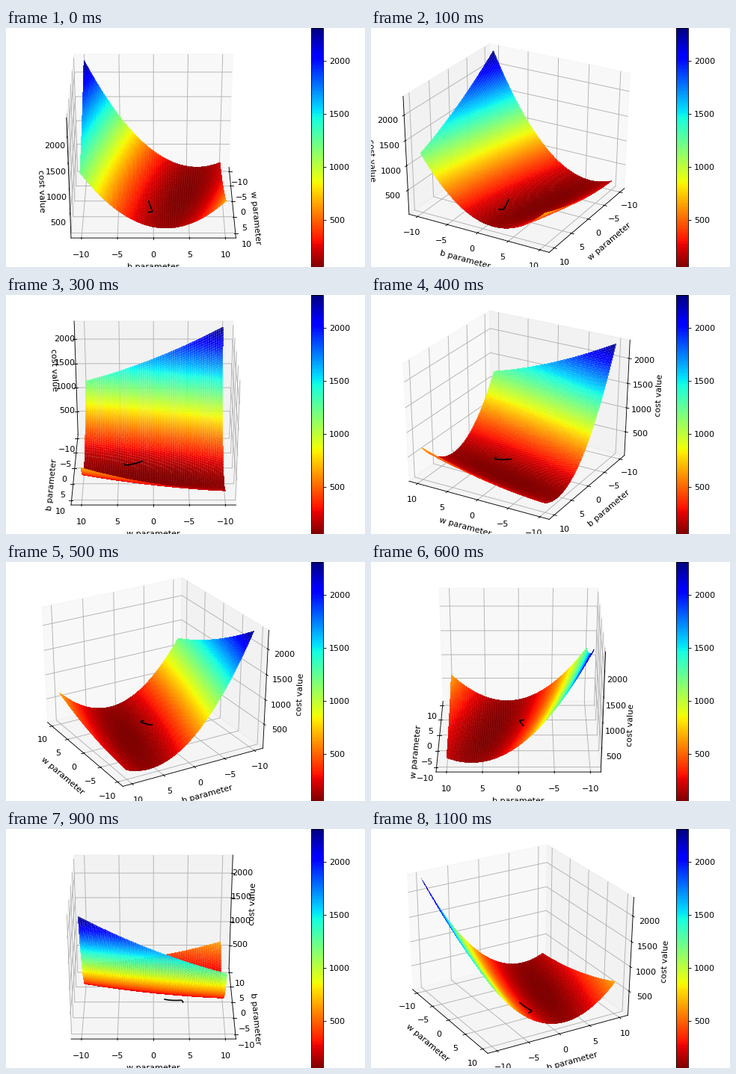
These frames come from a looping animation (480 px wide and 320 px high, 1.2 s). A matplotlib script:

```python
import numpy as np
import matplotlib.pyplot as plt
from matplotlib.animation import FuncAnimation
from matplotlib.cm import ScalarMappable
from matplotlib.colors import Normalize

FRAMES, INTERVAL = 12, 100
Z_LOW, Z_HIGH = 47, 2313
Z_TICKS = range(500, 2001, 500)
XY_TICKS = range(-10, 11, 5)


def cost(w, b):
    """Quadratic bowl with a slanted valley."""
    return 55 + 0.437 * (w + 0.52) ** 2 + 8.126 * (b - 4.12 + 0.2405 * w) ** 2


def padded(low, high):
    pad = (high - low) / 48
    return low - pad, high + pad


plt.rcParams["font.family"] = "DejaVu Sans"
fig = plt.figure(figsize=(6, 4), dpi=80, facecolor="white")

# Cube-shaped box stretched over the whole axes area.
ax = fig.add_axes([0, 0, 0.8, 1], projection="3d")
ax.apply_aspect = lambda position=None: None
ax.set_position([0, 0, 0.8, 1])
ax.set_box_aspect((1, 1, 1), zoom=np.sqrt(3) / 1.8294640721620434)

norm = Normalize(56, 2310)
side = np.linspace(-10, 10, 121)
w, b = np.meshgrid(side, side)
ax.plot_surface(w, b, cost(w, b), rcount=121, ccount=121, cmap="jet_r",
                vmin=norm.vmin, vmax=norm.vmax, alpha=0.7,
                linewidth=0, antialiased=False)

# Descent path
path_w = [1.62, 2.2, 2.8, 3.45, 4.05, 4.18, 4.28]
path_b = [-0.68, -0.56, -0.42, -0.28, -0.15, -0.35, -0.75]
path_z = [102, 80, 64, 54, 49, 48, 47]
ax.plot(path_w, path_b, path_z, color="black", lw=1.5, zorder=100)

ax.set_xlim(*padded(-11, 11))
ax.set_ylim(*padded(-11, 11))
ax.set_zlim(*padded(Z_LOW, Z_HIGH))
ax.set_xticks(XY_TICKS)
ax.set_yticks(XY_TICKS)
ax.set_zticks(Z_TICKS)
ax.set_xlabel("w parameter")
ax.set_ylabel("b parameter")
ax.set_zlabel("cost value")

bar = fig.add_axes([0.85, 0, 1 / 30, 1])
fig.colorbar(ScalarMappable(norm, "jet_r"), cax=bar, ticks=Z_TICKS)


def update(i):
    azim = 360 * i / FRAMES
    # A tiny nudge settles which panes show in edge-on views.
    nudge = 1e-3 * np.sin(np.radians(45 - azim))
    ax.view_init(elev=30, azim=azim + nudge)
    return []


anim = FuncAnimation(fig, update, frames=FRAMES, interval=INTERVAL,
                     init_func=lambda: [], repeat=True, repeat_delay=0)
plt.show()
```
